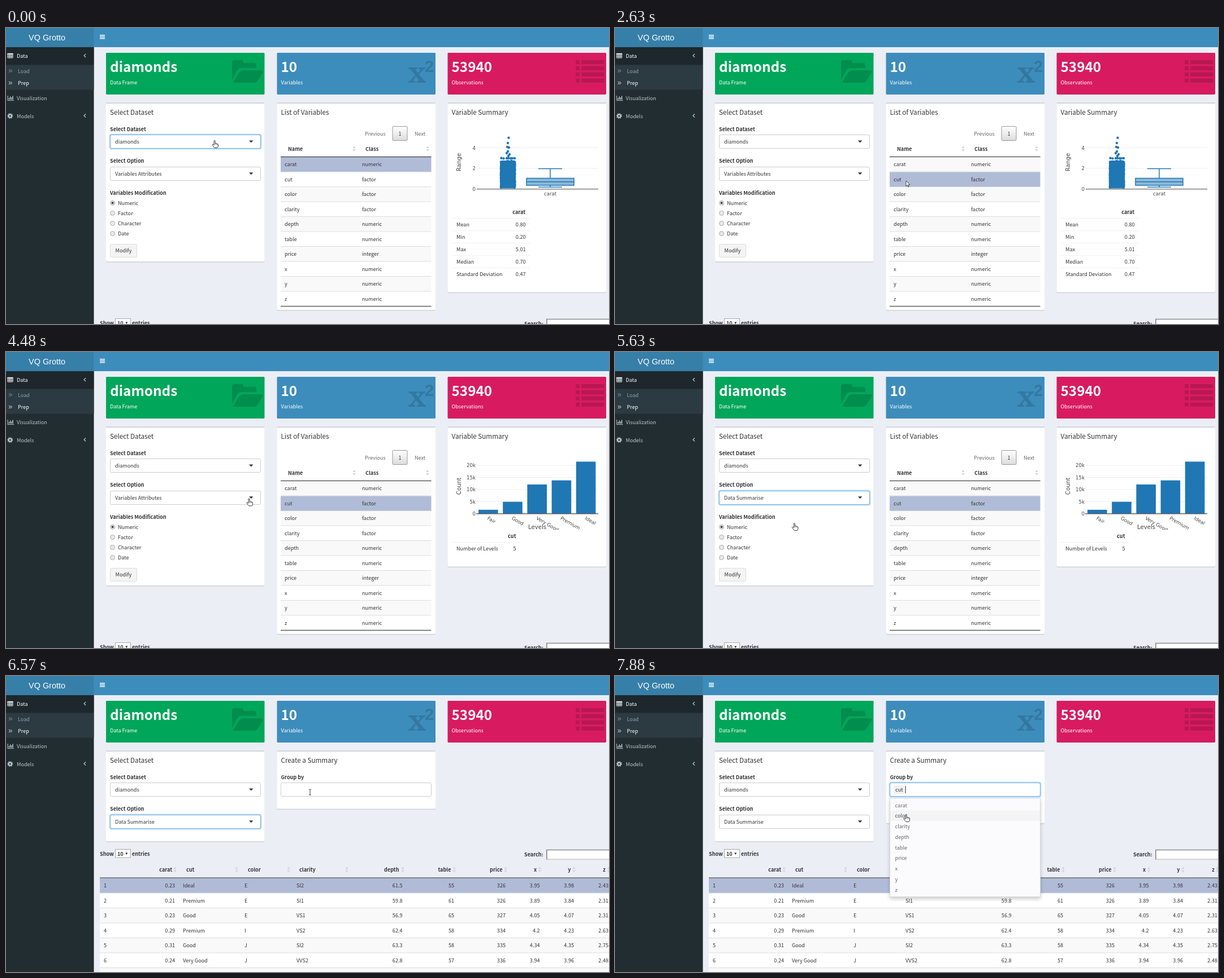
Recreate the animation shown at these times as an HTML page. Size 1067 by 525 pixels, loop 8000 ms.

```html
<!DOCTYPE html>
<html lang="en">
<head>
<meta charset="utf-8">
<title>Data prep dashboard</title>
<style>
html, body { margin: 0; width: 100%; height: 100%; overflow: hidden; background: #ebeef5; }
svg { display: block; font-family: "Noto Sans CJK JP", "Noto Sans CJK SC", "Noto Sans CJK KR", "Noto Sans CJK", "Open Sans", sans-serif; }
.plot { font-family: "DejaVu Sans", sans-serif; }
</style>
</head>
<body>
<svg id="stage" width="1067" height="525" viewBox="0 0 1067 525"></svg>
<script>
const LOOP = 8000, BLUE = '#1f77b4', INK = '#333', ROW = 26.5, ITEM = 18.75;
const attrs = o => Object.entries(o).map(([k, v]) => ` ${k}="${v}"`).join('');
const rect = (x, y, width, height, fill, o = {}) => `<rect${attrs({ x, y, width, height, fill, ...o })}/>`;
const path = (d, o = {}) => `<path${attrs({ d, ...o })}/>`;
const line = (x1, y1, x2, y2, stroke, w = 1) => path(`M${x1} ${y1}L${x2} ${y2}`, { stroke, 'stroke-width': w, fill: 'none' });
const dot = (cx, cy, r, fill, o = {}) => `<circle${attrs({ cx, cy, r, fill, ...o })}/>`;
const group = (id, body, o = {}) => `<g${attrs({ id, ...o })}>${body}</g>`;

// y is the middle of the text line
const text = (x, y, s, o = {}) => {
  const size = o['font-size'] || 9.1;
  return `<text${attrs({ x, y: y + size * 0.395, fill: INK, 'font-size': size, ...o })}>${s}</text>`;
};
const BOLD = { 'font-weight': 700 }, END = { 'text-anchor': 'end' }, MID = { 'text-anchor': 'middle' };
const bold = (x, y, s, o = {}) => text(x, y, s, { ...BOLD, ...o });
const title = (x, s) => text(x, 149, s, { 'font-size': 11.66 });
const sorter = (x, y) => path(`M${x - 2.6} ${y - 1}h5.2l-2.6-4zM${x - 2.6} ${y + 1}h5.2l-2.6 4z`, { fill: '#d3d3d8' });

const panel = (id, x, h) => group(id,
  rect(x, 133, 280.5, h + 0.7, '#d3d6dc', { rx: 2, class: 'shade' }) +
  rect(x, 132, 280.5, h, '#fff', { rx: 2, class: 'face' }) +
  rect(x, 132, 280.5, 2.2, '#d2d6de', { rx: 1 }));

const field = (id, x, y) =>
  rect(x + .5, y + .5, 266, 24, '#fff', { rx: 2.5, stroke: '#ccc' }) +
  group(id, rect(x - .5, y - .5, 268, 26, 'none', { rx: 3, stroke: '#66afe9', 'stroke-opacity': .35, 'stroke-width': 2.4 }) +
    rect(x + .5, y + .5, 266, 24, 'none', { rx: 2.5, stroke: '#66afe9' }));
const caret = y => path(`M430 ${y - 2}h7.4l-3.7 4z`, { fill: INK });

// Sidebar, header and value boxes
function frame() {
  const grey = '#b8c7ce', faint = 'rgba(0,0,0,.15)';
  const chevron = y => path(`M141 ${y - 3}l-3 3 3 3`, { stroke: grey, fill: 'none', 'stroke-width': 1.2 });
  const arrows = (y, c) => path(`M5 ${y - 2.6}l2.6 2.6-2.6 2.6M8 ${y - 2.6}l2.6 2.6-2.6 2.6`, { stroke: c, fill: 'none' });
  const box = (x, fill, big, small) => rect(x, 44, 280.5, 74, fill, { rx: 1.4 }) +
    bold(x + 7, 68, big, { 'font-size': 24.3, fill: '#fff' }) + text(x + 7, 96.5, small, { fill: '#fff' });
  let s = rect(0, 0, 155.5, 525, '#222d32') + rect(0, 34, 155.5, 31.5, '#1e282c') + rect(0, 65.5, 155.5, 44, '#2c3b41') +
    rect(155.5, 0, 912, 34, '#3c8dbc') + rect(0, 0, 155.5, 34, '#367fa9') +
    text(72.5, 16, 'VQ Grotto', { ...MID, 'font-size': 14.4, fill: '#fff', 'font-family': 'Liberation Sans, sans-serif' });
  for (let i = 0; i < 3; i++) s += rect(166, 12 + i * 2.9, 9, 1.6, '#fff');
  s += path('M3 45.5h9v7.5h-9zM3 48h9M3 50.5h9M6 46v7M9 46v7', { stroke: '#fff', fill: 'none', 'stroke-width': .9 }) +
    rect(2.5, 44.8, 10, 1.7, '#fff') + text(19, 49.5, 'Data', { fill: '#fff' }) + chevron(49) +
    arrows(76, '#8aa4af') + text(21, 76, 'Load', { fill: '#8aa4af' }) +
    arrows(97.5, '#fff') + text(21, 97.5, 'Prep', { fill: '#fff' }) +
    path('M3 120v8.5h11', { stroke: grey, fill: 'none' }) +
    path('M5.5 127v-3M7.7 127v-5.5M9.9 127v-4M12.1 127v-6.5', { stroke: grey, 'stroke-width': 1.4 }) +
    text(19, 124.5, 'Visualization', { fill: grey }) +
    dot(7.3, 156, 2.7, 'none', { stroke: grey, 'stroke-width': 2.2 }) +
    dot(7.3, 156, 4.2, 'none', { stroke: grey, 'stroke-width': 1.4, 'stroke-dasharray': '1.65 1.65' }) +
    text(19, 156, 'Models', { fill: grey }) + chevron(155.5);
  s += box(177, '#00a65a', 'diamonds', 'Data Frame') + box(479.5, '#3c8dbc', '10', 'Variables') + box(781.5, '#d81b60', '53940', 'Observations');
  s += path('M400 92V61q0-4 4-4h12q4 0 4 4v1h19q4 0 4 4v5H417q-5 0-8 4zM403 95l9-15q3-5 8-5h32q4 0 2 4l-8 13q-3 5-8 5h-33q-4 0-2-2z', { fill: faint });
  s += `<text x="711" y="96.5" font-size="50" font-weight="700" font-family="Noto Serif, serif" fill="${faint}">x</text>` +
    `<text x="741" y="78" font-size="29" font-weight="700" font-family="Liberation Sans, sans-serif" fill="${faint}">2</text>`;
  for (let i = 0; i < 4; i++) s += rect(1008, 57 + i * 10.9, 7, 7, faint) + rect(1018, 57 + i * 10.9, 40.5, 7, faint);
  return s;
}

function dataTable() {
  // name, header x, value x, sorter x, right aligned
  const cols = [['carat', 294, 299, 299, 1], ['cut', 319, 313, 408], ['color', 428, 422, 500], ['clarity', 519, 514, 603],
    ['depth', 695.5, 701.5, 702, 1], ['table', 787.5, 793, 793, 1], ['price', 878.5, 884, 884, 1],
    ['x', 939, 944.5, 944.5, 1], ['y', 999.5, 1005, 1005, 1], ['z', 1061, 1066, 1066, 1]];
  const rows = ['0.23,Ideal,E,SI2,61.5,55,326,3.95,3.98,2.43', '0.21,Premium,E,SI1,59.8,61,326,3.89,3.84,2.31',
    '0.23,Good,E,VS1,56.9,65,327,4.05,4.07,2.31', '0.29,Premium,I,VS2,62.4,58,334,4.2,4.23,2.63',
    '0.31,Good,J,SI2,63.3,58,335,4.34,4.35,2.75', '0.24,Very Good,J,VVS2,62.8,57,336,3.94,3.96,2.48', ''];
  let s = bold(166, 315, 'Show') + rect(193.5, 307.5, 27, 14.5, '#fff', { stroke: '#a9a9a9' }) + bold(197, 315, '10') +
    path('M211.3 313.5h4l-2 3.4z', { fill: '#222' }) + bold(223, 315, 'entries') + bold(917, 316, 'Search:') +
    rect(957, 308.5, 140, 16.5, '#fff', { stroke: '#b5b5b5' }) + path('M956.8 325.5V308.5H1067', { stroke: '#8c8c8c', fill: 'none', 'stroke-width': 1.6 });
  for (const [name, x, , sx, right] of cols) s += bold(x, 343.5, name, right ? END : {}) + sorter(sx, 343.5);
  rows.forEach((r, i) => {
    const y = 358.5 + i * ROW, c = y + ROW / 2 - .2;
    s += rect(166, y, 901, ROW, i ? (i % 2 ? '#fff' : '#f9f9f9') : '#b0bcd7') + line(166, y, 1067, y, '#ddd');
    if (!r) return;
    s += text(173, c, i + 1);
    r.split(',').forEach((v, k) => s += text(cols[k][2], c, v, cols[k][4] ? END : {}));
  });
  return s + line(166, 358, 1067, 358, '#222');
}

function variableList() {
  const vars = ['carat', 'cut', 'color', 'clarity', 'depth', 'table', 'price', 'x', 'y', 'z'];
  let s = title(486.5, 'List of Variables') + text(635, 187, 'Previous', { fill: '#666' }) +
    rect(684, 174.5, 26, 25, 'url(#btn)', { rx: 1.4, stroke: '#979797' }) + text(697, 187, '1', MID) + text(723, 187, 'Next', { fill: '#666' }) +
    bold(499, 214, 'Name') + sorter(616, 214) + bold(636, 214, 'Class') + sorter(746, 214), labels = '';
  vars.forEach((v, i) => {
    const y = 228.5 + i * ROW, kind = i > 0 && i < 4 ? 'factor' : i === 6 ? 'integer' : 'numeric';
    s += rect(486, y, 266.5, ROW, i % 2 ? '#fff' : '#f9f9f9') + line(486, y, 752.5, y, '#ddd');
    labels += text(493, y + 13.2, v) + text(630, y + 13.2, kind);
  });
  return s + rect(486, 0, 266.5, ROW - .5, '#b0bcd7', { id: 'picked' }) + labels +
    line(486, 228.5, 752.5, 228.5, '#222') + line(486, 493.5, 752.5, 493.5, '#222');
}

function variableEdit() {
  let s = bold(184, 292, 'Variables Modification');
  ['Numeric', 'Factor', 'Character', 'Date'].forEach((v, i) => {
    const y = 310.3 + i * 18.1;
    s += dot(188.6, y, 4, '#e9e9e9', { stroke: '#a2a2a2', 'stroke-width': .9 }) + (i ? '' : dot(188.6, y, 2, '#444')) + text(198, y, v);
  });
  return s + rect(184.5, 383.5, 47, 23, '#f4f4f4', { rx: 2, stroke: '#ddd' }) + text(193.5, 394.7, 'Modify');
}

const tick = (y, s) => text(831, y, s, { ...END, 'font-size': 8.6, fill: '#444', class: 'plot' });
const axisName = (x, y, s, turn) => `<text class="plot" text-anchor="middle" font-size="10.2" fill="#444" transform="translate(${x} ${y}) rotate(${turn})">${s}</text>`;

function caratSummary() {
  let seed = 7;
  const rnd = () => (seed = (seed * 16807) % 2147483647) / 2147483647;
  let s = line(833, 212.5, 1048, 212.5, '#eee') + line(833, 249, 1048, 249, '#eee') + line(833, 285.7, 1048, 285.7, '#444', 1.1) +
    tick(212.5, 4) + tick(249, 2) + tick(285.7, 0) + axisName(804.5, 238, 'Range', -90) +
    text(963, 293.5, 'carat', { ...MID, 'font-size': 8.6, fill: '#444', class: 'plot' });
  const pts = [[889.5, 194.7], [888, 204], [887, 211], [890, 212], [888, 219], [886, 222], [891, 224], [889, 227]];
  for (const x of [876.5, 880.5, 886, 889, 893, 896, 900]) pts.push([x, 230.8 + rnd() * .6]);
  for (let i = 0; i < 14; i++) pts.push([876 + i * 1.85, 235.5 + rnd() * 2.5]);
  for (let y = 238; y < 283; y += 1.6) pts.push([875.6 + rnd(), y], [899.6 + rnd(), y]);
  s += rect(876, 237, 24.5, 47.4, BLUE, { rx: 2 }) + pts.map(([x, y]) => dot(x, y, 2.2, BLUE)).join('');
  s += path('M963 266.5V249.5M942 249.5H984M963 279V282.2M942 282.2H984M921 266.5H1005V279H921ZM921 272.8H1005',
    { stroke: BLUE, 'stroke-width': 1.5, fill: 'rgba(31,119,180,.5)' });
  s += bold(919, 326, 'carat', END);
  [['Mean', '0.80'], ['Min', '0.20'], ['Max', '5.01'], ['Median', '0.70'], ['Standard Deviation', '0.47']].forEach(([k, v], i) => {
    const y = 348.8 + i * 21.9;
    s += line(789, y - 11, 927, y - 11, '#f0f0f0') + text(797, y, k) + text(919.5, y, v, END);
  });
  return s;
}

function cutSummary() {
  const levels = [['Fair', 1610], ['Good', 4906], ['Very Good', 12082], ['Premium', 13791], ['Ideal', 21551]];
  let s = '', names = '';
  for (let i = 0; i < 5; i++) {
    const y = 286.7 - i * 21.4;
    s += (i ? line(833, y, 1048, y, '#eee') : '') + tick(y, i ? i * 5 + 'k' : 0);
  }
  levels.forEach(([name, n], i) => {
    const h = n * .00428;
    s += rect(836 + i * 43.2, 286.7 - h, 34.6, h, BLUE);
    names += `<text class="plot" font-size="8.6" fill="#444" transform="translate(${851 + i * 43.2} 296.5) rotate(30)">${name}</text>`;
  });
  return s + line(832, 286.9, 1048, 286.9, '#444', 1.1) + `<g clip-path="url(#plotClip)">${names}</g>` +
    axisName(804.5, 238, 'Count', -90) + axisName(940, 313.5, 'Levels', 0) +
    bold(902.5, 326, 'cut', END) + line(789, 337.8, 910, 337.8, '#f0f0f0') + text(797, 348.8, 'Number of Levels') + text(902.5, 348.8, '5', END);
}

function menu(x, top, items, hover) {
  const h = items.length * ITEM + 6;
  return rect(x + .5, top, 266, h, '#fbfbfe', { stroke: '#d9d9df', filter: 'url(#drop)' }) +
    rect(x + 1, top + 3 + hover * ITEM, 265, ITEM, '#f4f4f5') +
    items.map((v, i) => text(x + 9.5, top + 12.4 + i * ITEM, v, { fill: i === hover ? '#444f56' : '#666' })).join('');
}

const CURSORS = {
  arrow: path('M0 0V9.6L2.3 7.5 3.8 11 5.3 10.4 3.8 7H6.9Z', { fill: '#fff', stroke: '#222', 'stroke-width': .8 }),
  hand: path('M-1 1q0-1 1-1t1 1v4q1.7-.6 1.9.4q1.7-.3 1.9.6q1.6 0 1.6 1.4v2.4q0 3-2 3.2h-4.2q-1.4-.6-4-4.8q-.6-1.2.6-1.5q1 0 2.2 1.6z', { fill: '#fff', stroke: '#222', 'stroke-width': .9 }) +
    path('M1 5v2.6M2.9 5.6v2.2M4.8 6.2v1.8', { stroke: '#222', 'stroke-width': .6 }),
  beam: path('M-2-4.7h1.4l.6.5.6-.5h1.4M0-4.2v8.6M-2 4.9h1.4l.6-.5.6.5h1.4', { fill: 'none', stroke: '#222', 'stroke-width': .9 })
};

document.getElementById('stage').innerHTML =
  `<defs><linearGradient id="btn" x2="0" y2="1"><stop stop-color="#fff"/><stop offset="1" stop-color="#dcdcdc"/></linearGradient>
  <clipPath id="plotClip"><rect x="789" y="180" width="270" height="135.5"/></clipPath>
  <filter id="drop" x="-10%" y="-10%" width="120%" height="140%"><feDropShadow dx="0" dy="3.5" stdDeviation="3" flood-opacity=".2"/></filter></defs>` +
  rect(0, 0, 1067, 525, '#ebeef5') + group('entries', dataTable()) + frame() +
  panel('left', 177, 282) + title(184, 'Select Dataset') +
  bold(184, 179, 'Select Dataset') + field('focusData', 184, 189) + text(193, 201.5, 'diamonds') + caret(201.5) +
  bold(184, 235.5, 'Select Option') + field('focusOption', 184, 246) +
  group('optAttr', text(193, 258.3, 'Variables Attributes')) + group('optSum', text(193, 258.3, 'Data Summarise')) + caret(258.3) +
  panel('middle', 479.5, 368) +
  group('explore', variableEdit() + variableList() + panel('right', 781.5, 336) + title(788.5, 'Variable Summary') +
    group('sumCarat', caratSummary()) + group('sumCut', cutSummary())) +
  group('summary', title(486.5, 'Create a Summary') + group('groupBy', bold(486.5, 179, 'Group by') + field('focusGroup', 486, 189) +
    group('tag', rect(493.5, 194, 18, 15, '#efefef', { rx: 2 }) + text(496, 201.5, 'cut')) +
    rect(0, 195, 1, 13, '#222', { id: 'blink' }))) +
  group('menu', '') + Object.keys(CURSORS).map(k => group(k, CURSORS[k])).join('');

const el = id => document.getElementById(id);
const show = (id, on) => el(id).style.display = on ? '' : 'none';
const setHeight = (id, h) => {
  el(id).querySelector('.face').setAttribute('height', h);
  el(id).querySelector('.shade').setAttribute('height', h + .7);
};

// start, end, number of steps, destination
const MOVES = [[440, 530, 2, 507, 257], [680, 1000, 5, 512, 265], [1930, 1930, 1, 514, 270], [2020, 2020, 1, 515, 271],
  [3480, 3560, 2, 510, 270], [3710, 4250, 8, 424, 260], [4400, 4480, 2, 430, 260], [5090, 5630, 8, 317.5, 303.5],
  [6110, 6570, 7, 538, 206], [7110, 7330, 4, 515, 245.5]];
function pointer(t) {
  let x = 369, y = 199.5;
  for (const [a, b, n, tx, ty] of MOVES) {
    if (t < a) break;
    const k = b > a ? Math.floor((t - a) / (b - a) * (n - 1) + 1e-6) + 1 : n;
    const p = Math.min(1, k / n), e = p * p * (3 - 2 * p);
    x += (tx - x) * e;
    y += (ty - y) * e;
  }
  return [x, y];
}

let menuKey = '';
function render(t) {
  const [x, y] = pointer(t);
  const explore = t < 5720, picked = t >= 7810, open = t >= 6720;
  show('explore', explore);
  show('summary', !explore);
  show('sumCarat', t < 3170);
  show('sumCut', t >= 3170);
  show('focusData', t < 2560);
  show('focusOption', t >= 4710 && !open);
  show('optAttr', t < 5630);
  show('optSum', t >= 5630);
  show('groupBy', t >= 5860);
  show('focusGroup', open);
  show('tag', picked);
  show('blink', picked || (open && t < 7260));
  el('blink').setAttribute('x', picked ? 513.5 : 495.5);
  el('picked').setAttribute('y', 229 + (t < 2560 ? 0 : ROW));
  el('entries').setAttribute('transform', `translate(0 ${explore ? 208 : 0})`);
  setHeight('left', explore ? 282 : 161);
  setHeight('middle', explore ? 368 : t < 5860 ? 47 : t < 7880 ? 103.5 : 129);
  setHeight('right', t < 3170 ? 336.5 : 248.5);

  let items = [], mx = 184, top = 274;
  if (t >= 4710 && t < 5630) items = ['Variables Attributes', 'Data Summarise'];
  if (open) {
    items = ['carat', 'cut', 'color', 'clarity', 'depth', 'table', 'price', 'x', 'y', 'z'].filter(v => !picked || v !== 'cut');
    mx = 486;
    top = 216.7;
  }
  const hover = Math.max(0, Math.min(items.length - 1, Math.floor((y - top - 3) / ITEM)));
  const key = items.length + ':' + hover;
  if (key !== menuKey) {
    menuKey = key;
    el('menu').innerHTML = items.length ? menu(mx, top, items, hover) : '';
  }

  const shape = t < 440 ? 'hand' : t < 4400 ? 'arrow' : t < 5720 ? 'hand' : t < 6490 ? 'arrow' : t < 7180 ? 'beam' : 'hand';
  for (const k in CURSORS) show(k, k === shape);
  el(shape).setAttribute('transform', `translate(${x} ${y})`);
}

const start = performance.now();
function tickFrame() {
  render((performance.now() - start) % LOOP);
  requestAnimationFrame(tickFrame);
}
tickFrame();
</script>
</body>
</html>
```
